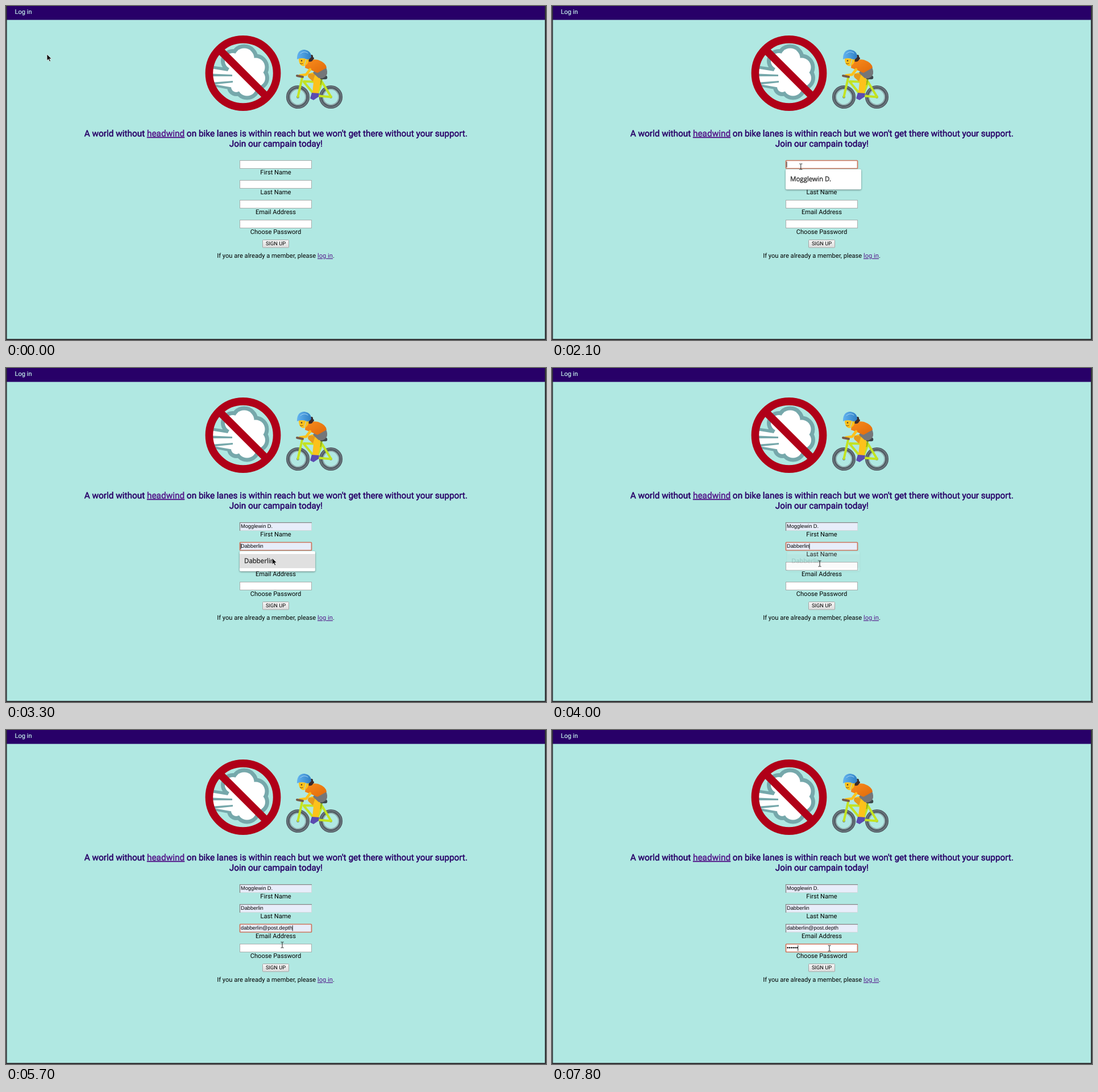
Animation, 950 px wide and 589 px high, one loop 8 s. Source, as an HTML page:

```html
<!DOCTYPE html>
<html lang="en">
<head>
<meta charset="utf-8">
<title>Sign up</title>
<style>
  html, body { margin: 0; width: 100%; height: 100%; overflow: hidden; background: #b0e8e2; }
  svg { display: block; width: 950px; height: 589px; }
  text { font: 11.13px Roboto, sans-serif; text-rendering: geometricPrecision; white-space: pre; }
  .center { text-anchor: middle; }
  .heading { font-size: 15.36px; fill: #280068; stroke: #280068; stroke-width: .5px; }
  .link { fill: #551a8b; text-decoration: underline; }
  .heading .link { stroke: #551a8b; }
  .value { font: 9.27px "Liberation Sans", Arial, sans-serif; }
  .option { font: 11.5px "Open Sans", "Noto Sans", sans-serif; fill: #2e2e2e; stroke: #2e2e2e; stroke-width: .35px; }
  .popup { filter: drop-shadow(0 1px 1.5px rgba(0, 0, 0, .45)); }
  .line { fill: none; stroke-linecap: round; stroke-linejoin: round; }
</style>
</head>
<body>
<svg id="stage" viewBox="0 0 950 589">
  <defs>
    <clipPath id="signHole"><circle cx="417" cy="118.5" r="54"/></clipPath>
    <linearGradient id="button" x2="0" y2="1"><stop stop-color="#f6f6f6"/><stop offset="1" stop-color="#dcdcdc"/></linearGradient>
    <linearGradient id="helmet"><stop stop-color="#63b4f0"/><stop offset="1" stop-color="#2f7fc4"/></linearGradient>
    <linearGradient id="shirt" x2="1" y2="1"><stop stop-color="#f98d1c"/><stop offset="1" stop-color="#e0690a"/></linearGradient>
    <g id="puffs">
      <circle cx="399" cy="97" r="14"/><circle cx="419" cy="92" r="17.5"/><circle cx="439" cy="108" r="16.5"/>
      <circle cx="441" cy="127" r="15"/><circle cx="424" cy="142" r="16.5"/><circle cx="405" cy="143" r="9"/>
    </g>
    <g id="wheel">
      <circle r="17.6" fill="none" stroke="#535d64" stroke-width="6"/>
      <circle r="18.2" fill="none" stroke="#6d7a82" stroke-width="1.6"/>
      <circle r="13.6" fill="none" stroke="#8fa5aa" stroke-width="1.4"/>
      <circle r="2.4" fill="#6b767c"/>
    </g>
  </defs>

  <rect width="950" height="589" fill="#b0e8e2"/>
  <rect width="950" height="24.5" fill="#280068"/>
  <path d="M.6 0V588H949V0" fill="none" stroke="#333538" stroke-width="2"/>
  <text x="15.5" y="14" fill="#c4f0ec" stroke="#c4f0ec" stroke-width=".2">Log in</text>

  <!-- no-wind sign -->
  <g clip-path="url(#signHole)">
    <use href="#puffs" fill="#76a8ab" stroke="#76a8ab" stroke-width="14"/>
    <path d="M360 105L402 111V149L360 141Z" fill="#76a8ab"/>
    <use href="#puffs" fill="#fff"/>
    <path d="M400 96H436V145H405L400 144L360 137V110L390 115Z" fill="#fff"/>
    <path d="M360 119.500L398 121V124L360 124ZM360 135L399 132V135L360 139Z" fill="#76a8ab"/>
  </g>
  <g fill="none" stroke="#b00018" stroke-width="13.6">
    <circle cx="417" cy="118.5" r="59.6"/><path d="M375 76.500L459 160.500"/>
  </g>

  <!-- cyclist -->
  <use href="#wheel" x="513.500" y="160.500"/>
  <use href="#wheel" x="571.500" y="160.500"/>
  <g class="line" stroke="#c3e322" stroke-width="4">
    <path d="M521 127L513.500 160M524 134L544 158L572 160.500L556 134L547 158M524 133L555 134"/>
  </g>
  <path class="line" d="M556 127L553 138" stroke="#95b512" stroke-width="3"/>
  <path class="line" d="M552 126H562" stroke="#3d464b" stroke-width="6.500"/>
  <path d="M541 117Q533 117 531 124L541 134L539 153L549 155L553 136L553 121Z" fill="#fcc21b"/>
  <path d="M533 119Q530 122 532 126L540 133L544 120Z" fill="#e59a1c"/>
  <path d="M538 153L551 154L550 160L541 166L535 163Z" fill="#5b4bb0"/>
  <path d="M546 109L562 106Q567 116 564 122Q558 130 550 127L540 118Z" fill="#747679"/>
  <path d="M527 101Q536 92 549 95Q563 100 564 109L548 118L539 114L526 109Z" fill="url(#shirt)"/>
  <path class="line" d="M535 112L528 121L517 122.500" stroke="#fcc21b" stroke-width="4.500"/>
  <path class="line" d="M512 123L522 125" stroke="#775b48" stroke-width="4"/>
  <path d="M533 87Q541 84 540 90Q544 92 540 95Q538 99 533 98L528 94Z" fill="#3b2b2a"/>
  <path d="M515 92Q515 105 523 106Q532 105 533 93Z" fill="#fcc21b"/>
  <circle cx="520" cy="96.500" r="1.2" fill="#4c3428"/>
  <path class="line" d="M517.500 101.500Q520 103 522 101.500" stroke="#7b4a1c"/>
  <path d="M512 91Q513 77 525 77Q537 79 537 90Q534 95 529 94Q521 90 512 94Z" fill="url(#helmet)"/>
  <path class="line" d="M518 84Q524 78 531 83M528 94L525 104" stroke="#a3d3f5"/>

  <text class="center heading" x="474.800" y="230">A world without <tspan class="link">headwind</tspan> on bike lanes is within reach but we won't get there without your support.</text>
  <text class="center heading" x="474.800" y="247.500">Join our campain today!</text>

  <g id="fields"></g>

  <rect x="451.500" y="412.500" width="46" height="13.500" rx="1" fill="url(#button)" stroke="#a5a5a5"/>
  <text class="center" x="474.500" y="422.300" style="font-size:9.27px">SIGN UP</text>
  <text class="center" x="474.500" y="444">If you are already a member, please <tspan class="link">log in</tspan>.</text>

  <g id="popups"></g>
  <path id="arrow" d="M0 0V11.300L2.700 8.900L4.600 13L6.500 12.200L4.700 8.200H8.200Z" fill="#111" stroke="#fff" stroke-width=".7"/>
  <path id="beam" d="M-2.500 -5H-.8L0 -4.300L.8 -5H2.500M0 -4.300V4.300M-2.500 5H-.8L0 4.300L.8 5H2.500" fill="none" stroke="#222"/>
</svg>

<script>
const LOOP = 8000, STEP = 100;
const byId = id => document.getElementById(id);
const show = (node, on) => node.setAttribute('visibility', on ? 'visible' : 'hidden');

function addGroup(parentId, markup) {
  const group = document.createElementNS('http://www.w3.org/2000/svg', 'g');
  group.innerHTML = markup;
  byId(parentId).append(group);
  return group;
}

// Times in ms: focus, popup opens, option hovered, option chosen, focus lost.
const fields = [
  { label: 'First Name', entry: 'Mogglewin D.', focus: 1500, open: 1600, hover: 2200, chosen: 2600, blur: 2900, fade: .35, misspelt: 43 },
  { label: 'Last Name', entry: 'Dabberlin', focus: 2900, open: 3000, hover: 3300, chosen: 4000, blur: 4400, fade: .15 },
  { label: 'Email Address', entry: 'dabberlin@post.depth', focus: 4400, open: 4500, hover: 5000, chosen: 5400, blur: 5900, fade: .3, popupWidth: 142 },
  { label: 'Choose Password', focus: 5900, blur: LOOP }
];
const keyPresses = [6600, 7200, 7300, 7300, 7800, 7800];
const pointerPath = [
  [300, 72, 85], [1200, 430, 275], [2000, 430, 275], [2300, 460, 307], [3100, 460, 307],
  [3400, 471, 345], [4800, 471, 345], [5100, 485, 374], [5600, 485, 374], [5700, 486, 379], [5800, 488, 385]
];

fields.forEach((f, i) => {
  f.y = 272 + 35 * i;
  const group = addGroup('fields', `
    <rect class="box" x="411.5" y="${f.y + .5}" width="126" height="14"/>
    <path class="inset" d="M411.5 ${f.y + 15}V${f.y + .6}H538" fill="none" stroke="#858585" stroke-width="1.3"/>
    <text class="value" x="413" y="${f.y + 10.3}"></text>
    <path class="squiggle" d="M413 ${f.y + 11.8}h${f.misspelt || 0}" stroke="#e05050" stroke-width=".8" stroke-dasharray="1.4 .7"/>
    <path class="caret" stroke="#000" stroke-width=".9"/>
    <text class="center" x="474.500" y="${f.y + 25}">${f.label}</text>`);
  f.parts = {};
  for (const name of ['box', 'inset', 'value', 'squiggle', 'caret']) f.parts[name] = group.querySelector('.' + name);

  if (!f.entry) return;
  const width = f.popupWidth || 133;
  f.popup = addGroup('popups', `
    <rect x="411" y="${f.y + 16}" width="${width}" height="35.500" rx="2" fill="#fff"/>
    <rect class="hover" x="411" y="${f.y + 21}" width="${width}" height="25" fill="#e0e0e0"/>
    <text class="option" x="419" y="${f.y + 37.3}">${f.entry}</text>`);
  f.popup.setAttribute('class', 'popup');
  f.hoverBar = f.popup.querySelector('.hover');
  f.popupCenter = [411 + width / 2, f.y + 33.5];
});

function renderField(f, t) {
  const { box, inset, value, squiggle, caret } = f.parts;
  const focused = t >= f.focus && t < f.blur;
  const filled = t >= f.hover;
  box.setAttribute('fill', filled ? '#e8edfa' : '#fff');
  box.setAttribute('stroke', focused ? '#cd745c' : filled ? '#d3d8dc' : '#a9adac');
  box.setAttribute('stroke-width', focused ? 1.7 : 1);
  box.setAttribute('rx', focused ? 1 : 0);
  show(inset, filled && !focused);
  show(squiggle, f.misspelt && focused && t >= f.chosen);

  const dots = keyPresses.filter(time => t >= time).length;
  value.textContent = f.entry ? (filled ? f.entry : '') : '•'.repeat(dots);
  const typed = f.entry ? t >= f.chosen : dots > 0;
  const caretX = 413 + (typed ? value.getComputedTextLength() + .3 : 0);
  caret.setAttribute('d', `M${caretX} ${f.y + 2.5}v10`);
  show(caret, focused);

  if (f.popup) renderPopup(f, t);
}

function renderPopup(f, t) {
  const fading = t >= f.chosen, gone = t >= f.chosen + STEP;
  const [cx, cy] = f.popupCenter;
  show(f.popup, t >= f.open && !gone);
  show(f.hoverBar, t >= f.hover && !gone);
  f.popup.setAttribute('opacity', fading ? f.fade : 1);
  f.popup.setAttribute('transform', fading ? `translate(${cx} ${cy}) scale(.96) translate(${-cx} ${-cy})` : '');
}

function pointerAt(t) {
  const next = pointerPath.findIndex(([time]) => time > t);
  if (next === 0) return pointerPath[0].slice(1);
  if (next < 0) return pointerPath.at(-1).slice(1);
  const [t0, x0, y0] = pointerPath[next - 1], [t1, x1, y1] = pointerPath[next];
  const k = (t - t0) / (t1 - t0), eased = k * k * (3 - 2 * k);
  return [x0 + (x1 - x0) * eased, y0 + (y1 - y0) * eased];
}

function renderPointer(t) {
  const [x, y] = pointerAt(t);
  const overPopup = fields.some(f => t >= f.open && t < f.chosen && y > f.y + 16 && y < f.y + 52);
  const overText = (y > 216 && y < 234) || (x > 411 && x < 538 && y > 234);
  const beam = overText && !overPopup;
  show(byId('beam'), beam);
  show(byId('arrow'), !beam);
  for (const id of ['beam', 'arrow']) byId(id).setAttribute('transform', `translate(${x} ${y})`);
}

const start = performance.now();
function frame(now) {
  const t = Math.floor(Math.max(0, now - start) % LOOP / STEP) * STEP;
  fields.forEach(f => renderField(f, t));
  renderPointer(t);
  requestAnimationFrame(frame);
}
frame(start);
</script>
</body>
</html>
```
